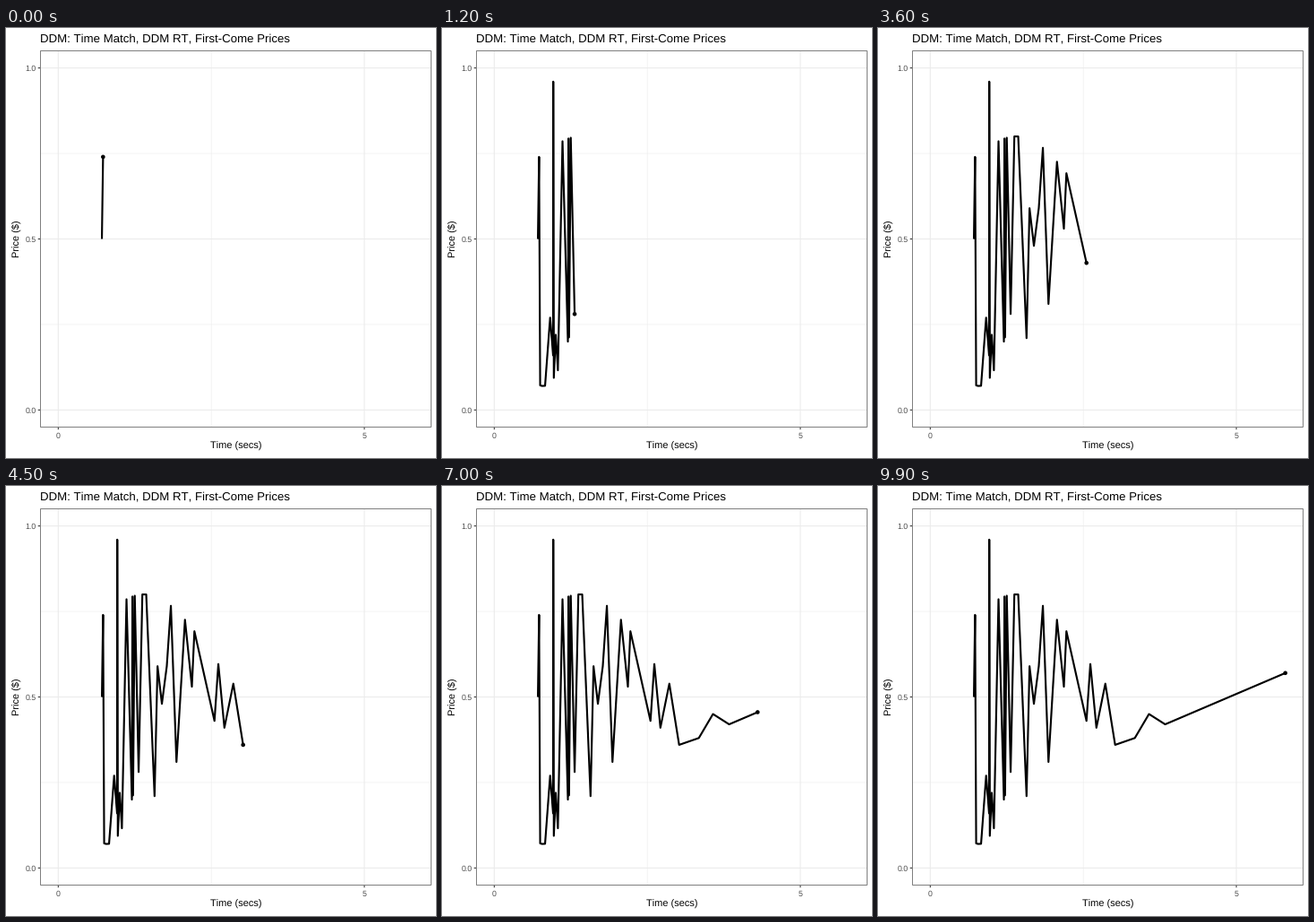
A matplotlib script that plays this animation: 480 by 480 pixels, repeating every 10000 ms.

```python
import numpy as np
import matplotlib.pyplot as plt
from matplotlib.animation import FuncAnimation

SIZE, DPI, FRAMES = 480, 72, 100
LEFT, RIGHT, TOP, BOTTOM = 38.5, 474.5, 25.5, 445.5
T_MAX, PAD = 5.8, 0.05
GRID, TICK, TICK_TEXT = "#ebebeb", "#333333", "#4d4d4d"

plt.rcParams.update({
    "font.family": "Liberation Sans",
    "text.hinting": "none",
    "text.kerning_factor": 6,
    "path.snap": False,
    "path.simplify": False,
})


def floor(t):
    """Low price in the early trading, rising slowly."""
    return 0.07 + 0.8 * (t - 0.8) ** 2


def ceiling(t):
    """High price, easing from 0.80 down to 0.45."""
    return 0.625 + 0.175 * np.cos(np.pi * (t - 1.4) / 2.2)


def make_quotes():
    dips = (0.75, 0.78, 0.83, 0.973, 1.04, 1.203, 1.222, 1.313)
    peaks = (1.115, 1.212, 1.25, 1.374, 1.437, 1.84, 2.07, 2.224,
             2.615, 2.86, 3.573)
    turns = [(0.713, .50), (0.732, .74), (0.913, .27), (0.961, .16),
             (0.964, .96), (1.005, .22), (1.573, .21), (1.622, .59),
             (1.693, .48), (1.773, .59), (1.931, .31), (2.183, .53),
             (2.552, .43), (2.714, .41), (3.02, .36), (3.342, .38),
             (3.837, .42), (T_MAX, .57)]
    turns += [(t, floor(t)) for t in dips]
    turns += [(t, ceiling(t)) for t in peaks]
    return np.array(sorted(turns)).T


def px(t):
    return LEFT + (t / T_MAX + PAD) / (1 + 2 * PAD) * (RIGHT - LEFT)


def py(price):
    return BOTTOM - (price + PAD) / (1 + 2 * PAD) * (BOTTOM - TOP)


fig = plt.figure(figsize=(SIZE / DPI, SIZE / DPI), dpi=DPI, facecolor="white")
ax = fig.add_axes([0, 0, 1, 1])
ax.set_xlim(0, SIZE)
ax.set_ylim(SIZE, 0)
ax.axis("off")


def rule(x0, y0, x1, y1, color, width):
    ax.plot([x0, x1], [y0, y1], color=color, lw=width, solid_capstyle="butt")


def label(x, y, text, size, color="black", ha="center", **kw):
    ax.text(x, y, text, size=size, color=color, ha=ha, va="baseline", **kw)


rule(px(2.5), TOP, px(2.5), BOTTOM, GRID, 0.53)
for p in (0.25, 0.75):
    rule(LEFT, py(p), RIGHT, py(p), GRID, 0.53)

for p in (0, 0.5, 1):
    rule(LEFT, py(p), RIGHT, py(p), GRID, 1.07)
    rule(LEFT - 2.75, py(p), LEFT, py(p), TICK, 1.07)
    label(33.6, py(p) + 3.2, f"{p:.1f}", 8.8, TICK_TEXT, "right")
for t in (0, 5):
    rule(px(t), TOP, px(t), BOTTOM, GRID, 1.07)
    rule(px(t), BOTTOM, px(t), BOTTOM + 2.75, TICK, 1.07)
    label(px(t), 458, str(t), 8.8, TICK_TEXT)

ax.add_patch(plt.Rectangle((LEFT, TOP), RIGHT - LEFT, BOTTOM - TOP,
                           fill=False, ec="#7f7f7f", lw=1, zorder=4))

label(LEFT, 16.2, "DDM: Time Match, DDM RT, First-Come Prices", 13.2, ha="left")
label((LEFT + RIGHT) / 2, 470, "Time (secs)", 11)
label(14.3, (TOP + BOTTOM) / 2, "Price ($)", 11, rotation=90,
      rotation_mode="anchor")

path, = ax.plot([], [], color="black", lw=2.13, solid_capstyle="butt",
                solid_joinstyle="round", zorder=3)
dot = ax.add_patch(plt.Circle((0, 0), 2.3, fc="black", lw=0, zorder=5))

times, prices = make_quotes()
points = np.column_stack([px(times), py(prices)])
# each quote lands on its nearest whole step; the head glides between them
steps = np.rint((times - times[0]) / np.ptp(times) * (FRAMES - 1))


def draw(i):
    n = np.searchsorted(steps, i, side="right")
    head = points[n - 1]
    if n < len(points):
        f = (i - steps[n - 1]) / (steps[n] - steps[n - 1])
        head = head + f * (points[n] - head)
    path.set_data(*np.vstack([points[:n], head]).T)
    dot.center = head
    return path, dot


anim = FuncAnimation(fig, draw, frames=FRAMES, interval=100, repeat=True,
                     repeat_delay=0, blit=False)
plt.show()
```
